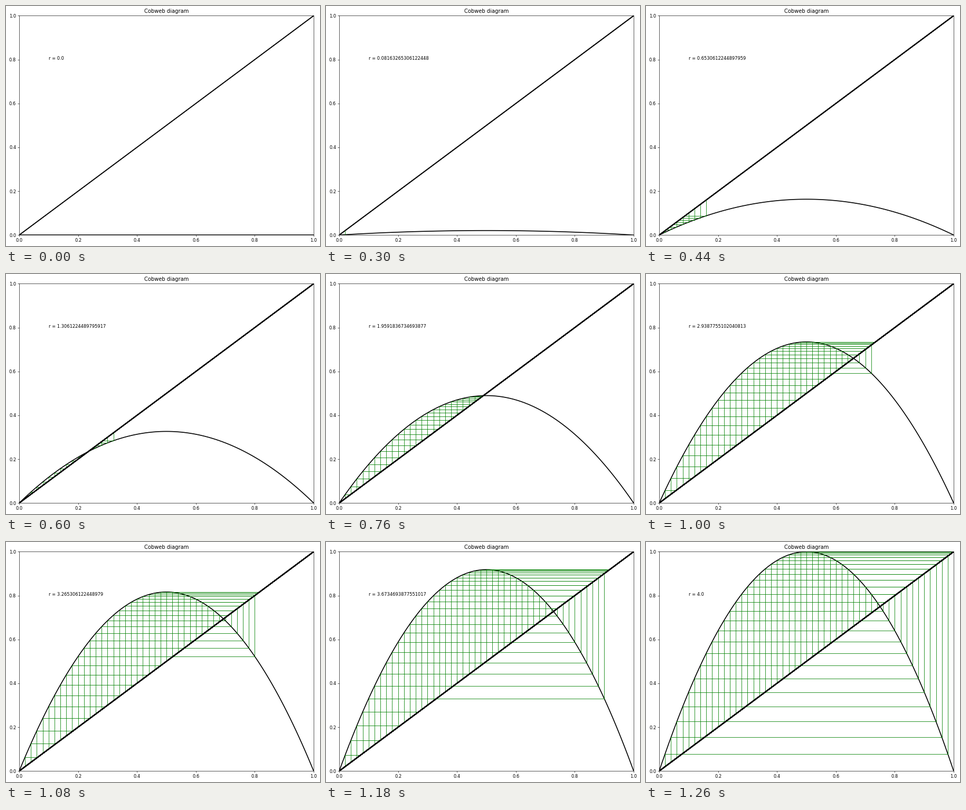
These frames come from a looping animation (595 by 455 pixels, 1.56 s). A matplotlib script:

```python
import numpy as np
import matplotlib.pyplot as plt
from matplotlib.animation import FuncAnimation

W, H, DPI = 595, 455, 60
STEPS = 50
HOLD = 15       # ticks spent on the first and on the last value of r
TICK = 20       # ms

rates = np.linspace(0, 4, STEPS)
starts = 0.02 * np.arange(STEPS)
xs = np.linspace(0, 1, 101)


def logistic(r, x):
    return r * x * (1 - x)


fig = plt.figure(figsize=(W / DPI, H / DPI), dpi=DPI, facecolor="white")
ax = fig.add_axes([25 / W, 20.8 / H, 558 / W, 415.8 / H])
ax.set(xlim=(0, 1), ylim=(0, 1))
ax.set_title("Cobweb diagram", fontsize=12)
ax.tick_params(labelsize=10)

curve, = ax.plot([], [], "k", lw=2)
label = ax.text(0.1, 0.8, "", fontsize=10)
ax.plot([0, 1], [0, 1], "k", lw=2)

# Each start adds its step and one more pass of the diagonal.
webs, diagonals = [], []
for _ in starts:
    webs += ax.plot([], [], "g", lw=1)
    diagonals += ax.plot([0, 1], [0, 1], "k", lw=2)


def update(tick):
    n = int(np.clip(tick - HOLD + 1, 0, STEPS - 1))
    r = rates[n]
    curve.set_data(xs, logistic(r, xs))
    label.set_text(f"r = {float(r)}")
    for i, (x, web, diagonal) in enumerate(zip(starts, webs, diagonals)):
        y = logistic(r, x)
        web.set_data([x, x, y], [x, y, y])
        web.set_visible(i <= n)
        diagonal.set_visible(i <= n)
    return [curve, label, *webs, *diagonals]


anim = FuncAnimation(fig, update, frames=STEPS - 2 + 2 * HOLD,
                     interval=TICK, repeat=True, repeat_delay=0)
plt.show()
```
